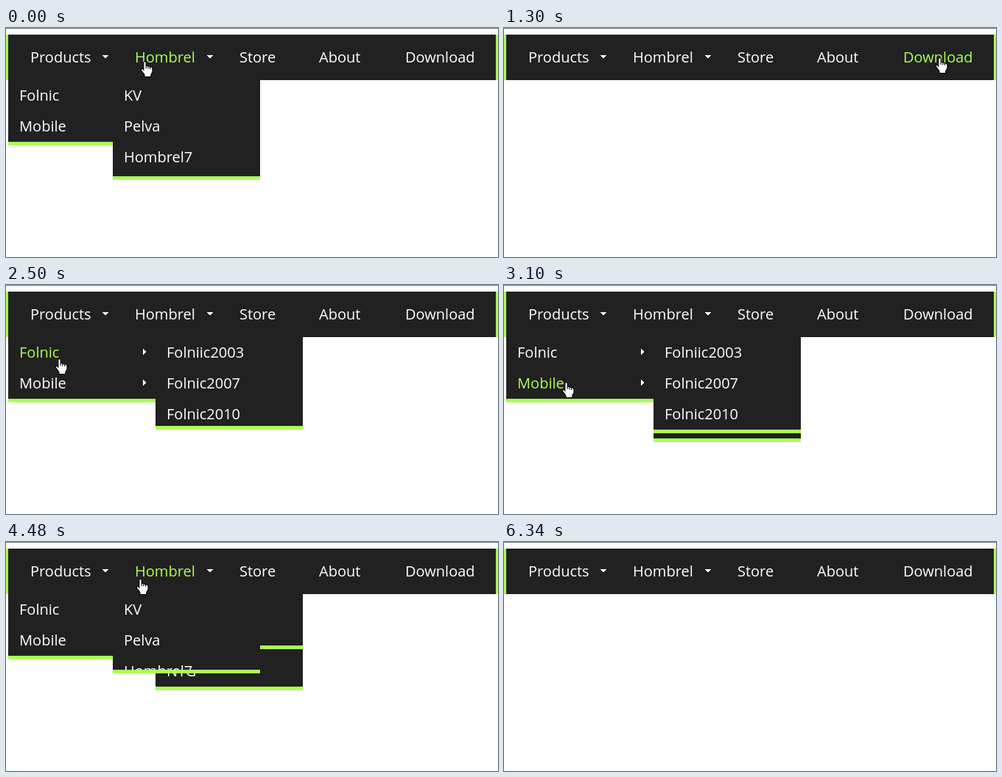
Write an HTML page with a canvas that moves like this. It is 668 by 312 pixels and loops after 7.27 s.

```html
<!DOCTYPE html>
<html lang="en">
<head>
<meta charset="utf-8">
<title>Drop-down menu</title>
<style>
html, body { margin: 0; width: 100%; height: 100%; overflow: hidden; background: #fff; }
canvas { display: block; }
</style>
</head>
<body>
<canvas id="stage" width="668" height="312"></canvas>
<script>
const W = 668, H = 312, LOOP = 7270, STEP = 60, GONE = 6340;
const DARK = '#212121', GREEN = '#aaff55', WHITE = '#fff';
const TOP = 71, ROW = 42, PANEL_W = 200, BORDER = 5;
const DURATION = 400, CLOSE_DELAY = 490;

const ctx = document.getElementById('stage').getContext('2d');
const layer = document.createElement('canvas');
layer.width = W;
layer.height = H;
const layerCtx = layer.getContext('2d');

const bar = [
  { label: 'Products', w: 142, arrow: true },
  { label: 'Hombrel', w: 142, arrow: true },
  { label: 'Store', w: 108 },
  { label: 'About', w: 117 },
  { label: 'Download', w: 153 }
];
bar.reduce((x, item) => (item.x = x) + item.w, 3);

// A panel opens when its item is entered and closes a while after it is left.
const products = {
  x: 3, rows: ['Folnic', 'Mobile'], arrows: true, fade: true,
  visits: [[-900, -328], [1850, 4380]]
};
const systems = {
  x: 145, rows: ['KV', 'Pelva', 'Hombrel7'], fade: true,
  visits: [[-328, 330], [1660, 1850], [4380, 4970]]
};
const suite = {
  x: 203, rows: ['Folniic2003', 'Folnic2007', 'Folnic2010'],
  visits: [[2366, 2810], [3440, 3946]]
};
const phones = {
  x: 203, rows: ['Lumbek', 'Sorvan', 'NTG'],
  visits: [[2880, 4380]]
};

// pointer stops: time, left, top
const stops = [
  [130, 183, 45], [970, 586, 40], [1300, 586, 40], [2100, 80, 46], [2500, 67, 100],
  [3200, 80, 134], [3580, 73, 99], [4100, 90, 130], [4480, 177, 50], [4960, 280, 65],
  [5140, 478, 150], [5380, 512, 215], [6100, 512, 215], [6280, 457, 286]
];

const hand = new Path2D(
  'M3.5 1.5 L4.5 .5 H5.5 L6.5 1.5 V5.5 L11.5 7 L13.5 7.5 L14.5 9 V13.5 ' +
  'L12.5 17 V19.5 H4.5 V17 L.5 11.5 V9.5 H2 L3.5 11 Z M6.5 5.5 V9 M9 6.5 V9.5 M11.5 7 V10');

// The picture refreshes in steps; the grid shifts at the first rest.
function snap(t) {
  const phase = t < 1300 ? 130 : 1300;
  return Math.max(0, phase + Math.floor((t - phase) / STEP) * STEP);
}

function easeOutBack(p) {
  const u = 1 - Math.min(p, 1), s = 1.70158;
  return 1 - (s + 1) * u ** 3 + s * u ** 2;
}

const smooth = p => p * p * (3 - 2 * p);

function panelState(panel, t) {
  const visit = panel.visits.filter(v => v[0] <= t).pop();
  if (!visit) return { open: 0, closing: true };
  const closeAt = visit[1] + CLOSE_DELAY;
  if (t < closeAt) return { open: easeOutBack((t - visit[0]) / DURATION), closing: false };
  return { open: Math.max(0, 1 - easeOutBack((t - closeAt) / DURATION)), closing: true };
}

function pointer(t) {
  if (t >= GONE) return null;
  const next = stops.findIndex(s => s[0] > t);
  const b = stops.at(next), a = next > 0 ? stops[next - 1] : b;
  const k = a === b ? 0 : smooth((t - a[0]) / (b[0] - a[0]));
  const at = i => Math.round(a[i] + (b[i] - a[i]) * k);
  return { x: at(1), y: at(2) };
}

function hovered(p, menuOpen) {
  if (!p) return '';
  const x = p.x + 5;
  if (p.y < TOP) return bar.find(b => x >= b.x && x < b.x + b.w)?.label;
  const inMenu = menuOpen && x < products.x + PANEL_W;
  return inMenu ? products.rows[Math.floor((p.y - TOP) / ROW)] : '';
}

function rect(c, color, x, y, w, h) {
  c.fillStyle = color;
  c.fillRect(x, y, w, h);
}

function arrow(c, x, y, sideways) {
  for (let i = 0; i < 4; i++) {
    const size = 8 - 2 * i;
    if (sideways) rect(c, WHITE, x + i, y + i, 1, size);
    else rect(c, WHITE, x + i, y + i, size, 1);
  }
}

function label(c, text, x, y, hot) {
  c.font = '20px "Open Sans", "Noto Sans", sans-serif';
  c.fillStyle = text === hot ? GREEN : WHITE;
  c.fillText(text, x, y);
}

function drawPanel(panel, t, hot) {
  const { open, closing } = panelState(panel, t);
  const h = Math.round(panel.rows.length * ROW * open);
  if (h <= 0) return;
  const c = layerCtx;
  c.clearRect(0, 0, W, H);
  c.save();
  c.beginPath();
  c.rect(panel.x, TOP, PANEL_W, h);
  c.clip();
  rect(c, DARK, panel.x, TOP, PANEL_W, h);
  panel.rows.forEach((text, i) => {
    const y = TOP + i * ROW;
    label(c, text, panel.x + 15, y + 28, hot);
    if (panel.arrows) arrow(c, panel.x + 183, y + 16, true);
  });
  c.restore();
  rect(c, GREEN, panel.x, TOP + h, PANEL_W, BORDER);
  ctx.globalAlpha = panel.fade && closing ? open : 1;
  ctx.drawImage(layer, 0, 0);
  ctx.globalAlpha = 1;
}

function drawBar(hot) {
  rect(ctx, '#777', 0, 0, W, 1);
  rect(ctx, GREEN, 0, 9, W, 62);
  rect(ctx, DARK, 3, 9, 662, 62);
  for (const item of bar) {
    label(ctx, item.label, item.x + 30, 47, hot);
    if (item.arrow) arrow(ctx, item.x + 128, 37);
  }
}

function drawHand(p) {
  ctx.save();
  ctx.translate(p.x, p.y);
  ctx.scale(1.1, 1.1);
  ctx.fillStyle = WHITE;
  ctx.strokeStyle = '#000';
  ctx.fill(hand);
  ctx.stroke(hand);
  ctx.restore();
}

function draw(t) {
  const menuOpen = !panelState(products, t).closing;
  const p = pointer(t), hot = hovered(p, menuOpen);
  rect(ctx, WHITE, 0, 0, W, H);
  drawBar(hot);
  drawPanel(products, t, hot);
  if (menuOpen) {
    drawPanel(phones, t, hot);
    drawPanel(suite, t, hot);
  }
  drawPanel(systems, t, hot);
  if (p) drawHand(p);
}

const start = performance.now();
function frame() {
  draw(snap((performance.now() - start) % LOOP));
  requestAnimationFrame(frame);
}
frame();
</script>
</body>
</html>
```
